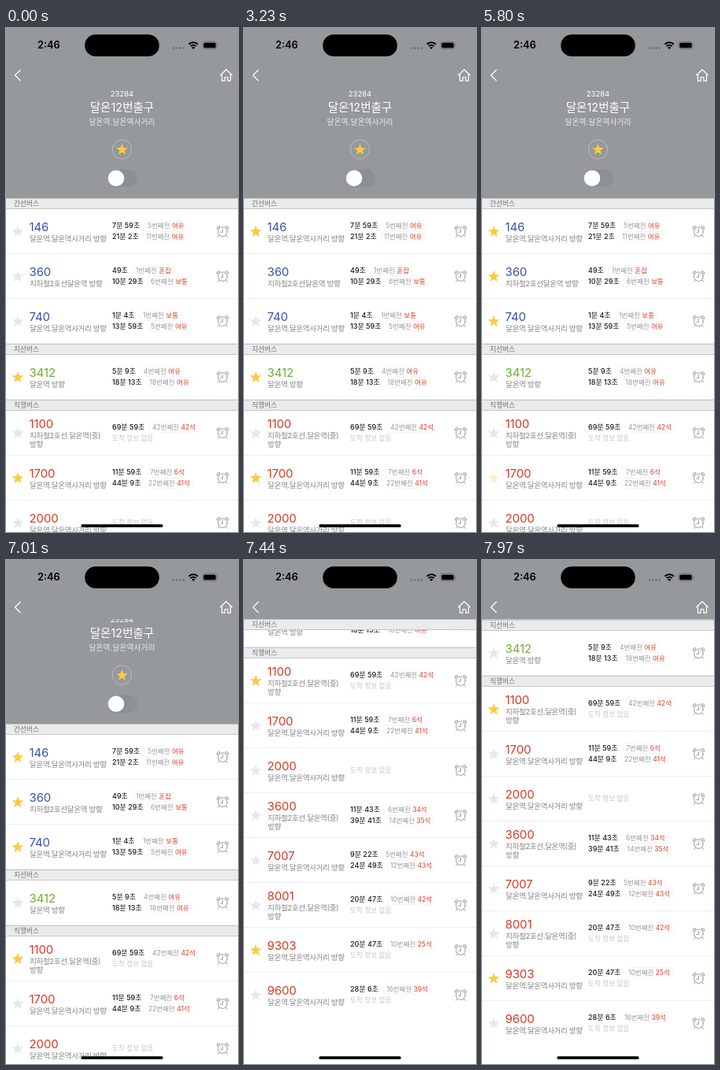
An HTML page for the animation above (8 s loop, 295 px wide and 640 px high).

```html
<!DOCTYPE html>
<html lang="ko">
<head>
<meta charset="utf-8">
<style>
html, body { margin: 0; width: 100%; height: 100%; overflow: hidden; background: #fff; }
body { position: relative; font-family: Inter, "Noto Sans CJK KR", "Noto Sans CJK", sans-serif; }
div, span, svg { position: absolute; }
svg { left: 0; top: 0; overflow: visible; }
span { line-height: 14px; white-space: pre; }
#page { left: 0; top: 0; width: 295px; }
#head { width: 295px; height: 216px; background: #95999c; color: #fff; }
#head span { width: 295px; text-align: center; }
#nav { width: 295px; height: 75px; background: #95999c; }
.row { left: 0; width: 295px; height: 57px; box-sizing: border-box; border-bottom: 1px dotted #dedede; }
.row:last-child { border: 0; }
.bar { left: 0; top: 0; width: 295px; height: 14px; box-sizing: border-box; background: #ebebeb;
  border: solid #c6c6c6; border-width: 1px 0; }
.bar span { font-size: 8.7px; color: #737373; }
.no { font-size: 15px; letter-spacing: -.1px; }
.dest { font-size: 9.6px; letter-spacing: -.37px; color: #858585; }
.time { font-size: 9px; font-weight: 500; color: #1a1a1a; }
.none { font-size: 8.6px; color: #c6c6c6; }
.pill { font-size: 8.5px; line-height: 12px; color: #999; margin: 0 0 0 -4px; padding: 0 3px;
  border: 1px dotted #efefef; border-radius: 4px; }
.pill b { font-weight: 400; color: #d8432d; }
</style>
</head>
<body>
<div id="page"></div>
<div id="bars"></div>
<div id="nav">
  <span style="left:40px;top:15px;font-size:12.8px;font-weight:600">2:46</span>
  <svg width="295" height="75" fill="none">
    <rect x="100.2" y="8.3" width="94.6" height="27.8" rx="13.9" fill="#000"/>
    <path d="M213 25.5h.01m4.3 0h.01m4.3 0h.01m4.3 0h.01" stroke="#6b6f72" stroke-width="2.6" stroke-linecap="round"/>
    <path d="M232.5 20.7a8 8 0 0 1 11.4 0M234.7 23.1a5 5 0 0 1 7 0" stroke="#000" stroke-width="2"/>
    <path d="M238.2 27l-2.1-2.2a3 3 0 0 1 4.2 0z" fill="#000"/>
    <rect x="250" y="17.4" width="18" height="9.2" rx="2.8" stroke="#63676a" stroke-width=".8"/>
    <rect x="251.3" y="18.7" width="15.4" height="6.6" rx="1.6" fill="#000"/>
    <path d="M269.3 20.5q1.5 1.5 0 3z" fill="#63676a"/>
    <g stroke="#fff" stroke-width="1.2" stroke-linejoin="round">
      <path d="M18.5 53l-7 7 7 7"/>
      <path d="M272.3 60.3l7.7-7.5 7.7 7.5M274.5 58.6v8.6h3.6v-4.7h3.8v4.7h3.6v-8.6"/>
    </g>
  </svg>
</div>
<svg width="295" height="640"><rect x="95.3" y="630.2" width="104.4" height="3.8" rx="1.9"/></svg>
<script>
const LOOP = 8000, GOLD = '#f8cb42', GREY = '#e7e7e7';
const BLUE = '#3a53a4', GREEN = '#6cae35', RED = '#d93a22';
const CROSS = '달온역.달온역사거리 방향', METRO = '지하철2호선.달온역(중)|방향';

// row: number, destination, starred at start, toggle time, arrivals [time, pill x, ahead, seats]
const sections = [
  ['간선버스', BLUE, [
    ['146', CROSS, 0, 2530, ['7분 59초', 180, 5, '여유'], ['21분 2초', 178, 11, '여유']],
    ['360', '지하철2호선달온역 방향', 0, 3230, ['49초', 165, 1, '혼잡'], ['10분 29초', 184, 6, '보통']],
    ['740', CROSS, 0, 4750, ['1분 4초', 174, 1, '보통'], ['13분 59초', 184, 5, '여유']]]],
  ['지선버스', GREEN, [
    ['3412', '달온역 방향', 1, 4000, ['5분 9초', 175, 4, '여유'], ['18분 13초', 182.5, 18, '여유']]]],
  ['직행버스', RED, [
    ['1100', METRO, 0, 6440, ['69분 59초', 186, 42, '42석']],
    ['1700', CROSS, 1, 5800, ['11분 59초', 183, 7, '6석'], ['44분 9초', 181, 22, '41석']],
    ['2000', CROSS, 0, LOOP],
    ['3600', METRO, 0, LOOP, ['11분 43초', 183, 6, '34석'], ['39분 41초', 184.5, 14, '35석']],
    ['7007', CROSS, 0, LOOP, ['9분 22초', 180, 5, '43석'], ['24분 49초', 186, 12, '43석']],
    ['8001', METRO, 0, LOOP, ['20분 47초', 186, 10, '42석']],
    ['9303', CROSS, 1, LOOP, ['20분 47초', 186, 10, '25석']],
    ['9600', CROSS, 0, LOOP, ['28분 6초', 181, 16, '39석']]]]
];

// stepped flick, overshoot and settle: [time, scroll offset]
const scroll = [[0, 0], [7010, 8], [7120, 62], [7230, 180], [7330, 296], [7440, 361],
  [7550, 362], [7650, 350], [7750, 339], [7870, 330], [7970, 325]];
// star change: [ms since tap, opacity, already switched]
const fadeOn = [[0, 0, 1], [100, .5, 1], [210, .85, 1], [310, 1, 1]];
const fadeOff = [[0, .28, 0], [120, .8, 1], [330, 1, 1]];

const $ = id => document.getElementById(id);
const at = (steps, t) => steps.findLast(s => s[0] <= t);
const text = (cls, x, y, s, style = '') =>
  `<span class="${cls}" style="left:${x}px;top:${y - 7}px;${style}">${s}</span>`;

const starPath = (x, y, R = 7.2) => 'M' + Array.from({length: 10}, (_, i) => {
  const r = i % 2 ? R * .42 : R, a = i * Math.PI / 5;
  return (x + r * Math.sin(a)).toFixed(2) + ' ' + (y - r * Math.cos(a)).toFixed(2);
}).join('L') + 'z';

const icons = `<svg width="295" height="57">
  <path class="star" d="${starPath(15, 28.8)}" stroke-width=".5" stroke-linejoin="round"/>
  <g transform="translate(275.5 28.7)" fill="none" stroke="#999" stroke-linecap="round">
    <circle r="5.8"/><path d="M0-3.2V.6H-2.6M-4.4 4.6l-1.6 2M4.4 4.6l1.6 2"/>
    <path d="M-7-3.6a2.4 2.4 0 0 1 3.3-3.2zM7-3.6a2.4 2.4 0 0 0-3.3-3.2z"/>
  </g></svg>`;

function arrivals(list) {
  const none = y => text('none', 135, y, '도착 정보 없음');
  if (!list.length) return none(28);
  const lines = list.map(([time, x, ahead, state], i) => {
    const y = 21 + i * 14.4;
    return text('time', 135, y, time) + text('pill', x, y, `${ahead}번째전 <b>${state}</b>`);
  });
  return lines.join('') + (list[1] ? '' : none(35.2));
}

function rowHtml(y, color, [no, dest, , , ...list]) {
  const parts = dest.split('|'), up = parts[1] ? 6 : 0;
  return `<div class="row" style="top:${y}px">${icons}` +
    text('no', 29.5, 23 - up, no, `color:${color}`) +
    parts.map((s, i) => text('dest', 30, 38 - up + i * 10.5, s)).join('') + arrivals(list) + '</div>';
}

let html = `<div id="head">
  ${text('', 0, 84, '23284', 'font-size:9.5px')}
  ${text('', 0, 101, '달온12번출구', 'font-size:14.5px')}
  ${text('', 0, 120, '달온역.달온역사거리', 'font-size:9.8px;color:#e9eaeb')}
  <svg width="295" height="216">
    <circle cx="147.5" cy="154" r="12.2" fill="none" stroke="#c3c6c8" stroke-width=".8"/>
    <path d="${starPath(147.5, 154.6, 7.6)}" fill="${GOLD}"/>
    <rect x="129" y="179.5" width="38" height="22.5" rx="11.2" fill="#8c9093"/>
    <circle cx="140" cy="190.7" r="10.3" fill="#fff"/>
  </svg></div>`;
let y = 216, barHtml = '';
const tops = [], rows = [];
for (const [title, color, list] of sections) {
  tops.push(y);
  barHtml += `<div class="bar">${text('', 10, 5.8, title)}</div>`;
  y += 14;
  for (const row of list) {
    html += rowHtml(y, color, row);
    rows.push(row);
    y += 57;
  }
}
$('page').innerHTML = html;
$('bars').innerHTML = barHtml;
const stars = document.querySelectorAll('.star'), bars = document.querySelectorAll('.bar');

function draw(t) {
  const off = at(scroll, t)[1];
  $('page').style.transform = `translateY(${-off}px)`;
  bars.forEach((bar, i) => {
    const next = (tops[i + 1] ?? 9999) - off - 14;
    bar.style.transform = `translateY(${Math.min(Math.max(75, tops[i] - off), next)}px)`;
  });
  stars.forEach((star, i) => {
    const [, , on, tap] = rows[i];
    const [, alpha, switched] = t < tap ? [0, 1, 0] : at(on ? fadeOff : fadeOn, t - tap);
    const color = on ^ switched ? GOLD : GREY;
    star.setAttribute('fill', color);
    star.setAttribute('stroke', color);
    star.setAttribute('opacity', alpha);
  });
}

const start = performance.now();
function tick() {
  draw((performance.now() - start) % LOOP);
  requestAnimationFrame(tick);
}
tick();
</script>
</body>
</html>
```
